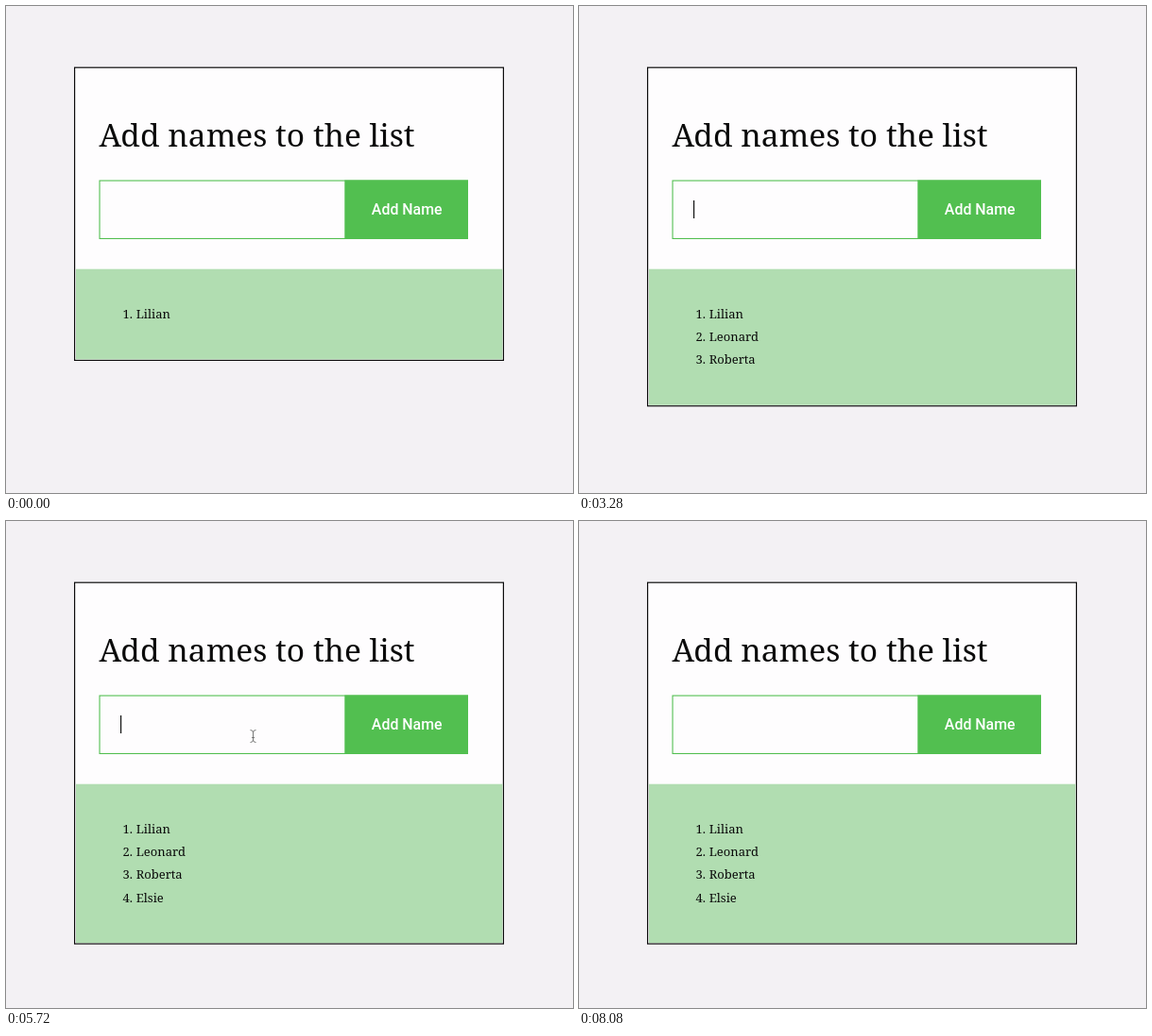
An HTML page with a canvas that plays this animation: 600x516 px, repeating every 8120 ms.

```html
<!DOCTYPE html>
<html lang="en">
<head>
<meta charset="utf-8">
<title>Add names to the list</title>
<style>
html, body { margin: 0; width: 100%; height: 100%; overflow: hidden; background: #f3f1f4; }
canvas { display: block; }
</style>
</head>
<body>
<canvas id="stage" width="600" height="516"></canvas>
<script>
const ctx = document.getElementById('stage').getContext('2d');
const LOOP = 8120;
const SERIF = '"Noto Serif", serif';
const SANS = 'Roboto, sans-serif';
const LIST_FONT = '500 13px ' + SERIF;
const FIELD_FONT = '15.5px ' + SANS;
const GREEN = '#52bf50';
const WHITE = '#fefdfe';
const INK = '#0b0b0b';
const ROW = 24.2;

const first = 'Lilian';
// typing start, ms per letter, moment the name joins the list
const entries = [
  { name: 'Leonard', start: 360, step: 80, add: 1160 },
  { name: 'Roberta', start: 1480, step: 72, add: 2240 },
  { name: 'Elsie', start: 3600, step: 110, add: 4440 }
];

function box(x, y, w, h, color) {
  ctx.fillStyle = color;
  ctx.fillRect(x, y, w, h);
}

function framed(x, y, w, h, line, edge, fill) {
  box(x, y, w, h, edge);
  box(x + line, y + line, w - 2 * line, h - 2 * line, fill);
}

function label(str, x, y, font, color = INK, align = 'left') {
  ctx.font = font;
  ctx.fillStyle = color;
  ctx.textAlign = align;
  ctx.fillText(str, x, y);
}

function fieldState(t) {
  let text = '', last = -300;
  for (const e of entries) {
    if (t >= e.add) {
      last = e.add;
    } else if (t >= e.start) {
      const n = Math.min(e.name.length, 1 + Math.floor((t - e.start) / e.step));
      text = e.name.slice(0, n);
      last = e.start + (n - 1) * e.step;
    }
  }
  // the caret restarts its blink with each key
  const caret = t >= 200 && (t - last) % 1000 < 500;
  return { text, caret };
}

function pointer(x, y) {
  for (const [width, color] of [[2.6, '#ffffff'], [1, '#777777']]) {
    ctx.lineWidth = width;
    ctx.strokeStyle = color;
    ctx.beginPath();
    for (const s of [-1, 1]) {
      ctx.moveTo(x - 3, y + 6.5 * s);
      ctx.quadraticCurveTo(x, y + 6.5 * s, x, y + 4 * s);
      ctx.quadraticCurveTo(x, y + 6.5 * s, x + 3, y + 6.5 * s);
    }
    ctx.moveTo(x, y - 5);
    ctx.lineTo(x, y + 5);
    ctx.moveTo(x - 1.5, y + 1.5);
    ctx.lineTo(x + 1.5, y + 1.5);
    ctx.stroke();
  }
}

function draw(t) {
  const names = [first, ...entries.filter(e => t >= e.add).map(e => e.name)];
  const bottom = 376 + ROW * (names.length - 1);

  box(0, 0, 600, 516, '#f3f1f4');
  framed(72, 64.6, 455, bottom - 64.6, 1.2, INK, WHITE);
  box(74, 278.7, 451.4, bottom - 280.3, '#b1ddb1');
  label('Add names to the list', 98.4, 149, '500 33.5px ' + SERIF);

  framed(98.5, 184.5, 390.5, 62.5, 1.1, GREEN, WHITE);
  box(358.3, 184.5, 130.7, 62.5, GREEN);
  label('Add Name', 424.2, 221, '500 15.9px ' + SANS, '#ffffff', 'center');

  const field = fieldState(t);
  label(field.text, 120.6, 221, FIELD_FONT);
  if (field.caret) {
    const x = 121 + Math.round(ctx.measureText(field.text).width);
    box(x, 206, 1.2, 19, '#111111');
  }

  names.forEach((name, i) => {
    const y = 331 + ROW * i;
    label(i + 1 + '.', 134, y, LIST_FONT, INK, 'right');
    label(name, 137.7, y, LIST_FONT);
  });

  if (t >= 5560 && t < 6160) pointer(261.5, 228);
}

function frame(now) {
  draw(now % LOOP);
  requestAnimationFrame(frame);
}
draw(0);
requestAnimationFrame(frame);
</script>
</body>
</html>
```
